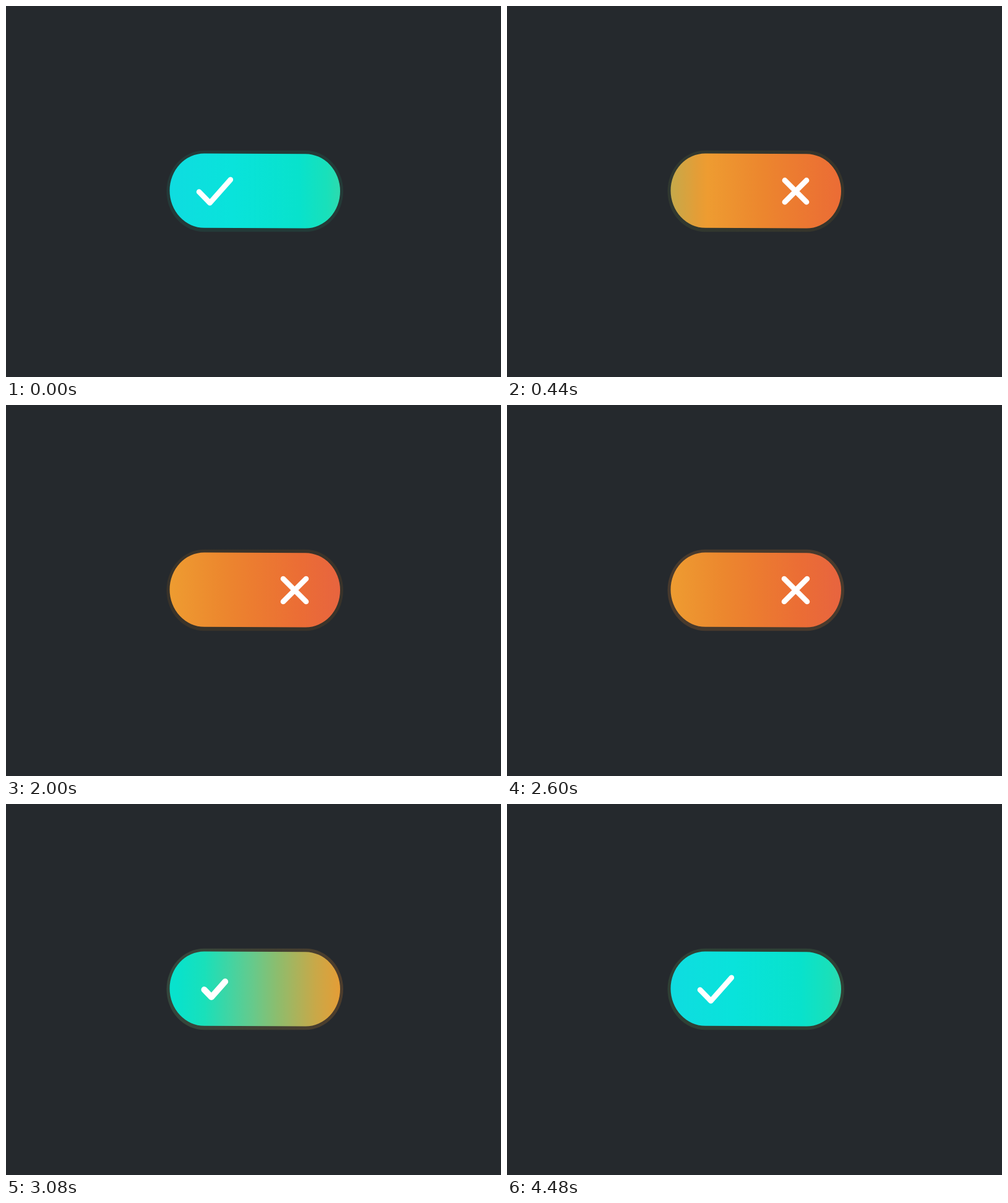
Recreate the animation shown at these times as an HTML page with a canvas. Size 800 px wide and 600 px high, loop 4640 ms.

```html
<!DOCTYPE html>
<html lang="en">
<head>
<meta charset="utf-8">
<title>Toggle</title>
<style>
  html, body { margin: 0; width: 100%; height: 100%; overflow: hidden; background: #25292d; }
  canvas { display: block; width: 800px; height: 600px; }
</style>
</head>
<body>
<canvas id="stage" width="800" height="600"></canvas>
<script>
const ctx = document.getElementById('stage').getContext('2d');
const LOOP = 4640, STEP = 40;
const SLIDE = 720, TURN_OFF = -56, TURN_ON = 2696;
const TRAVEL = 490, BAND = 765, LEFT = 265;

// Colour band that slides behind the pill: [distance, colour]
const band = [
  [0, '#0fdce0'], [100, '#09e3db'], [210, '#08e2cc'], [255, '#19e0ba'],
  [300, '#46d3a0'], [335, '#68c98a'], [375, '#8fbc6c'], [435, '#c9a848'],
  [475, '#e59d36'], [490, '#ee9c31'], [575, '#ec872e'], [625, '#ec7c30'],
  [700, '#eb6d35'], [765, '#e7643f']
];

// Rim colours over time: [ms, left rgb, right rgb]
const rim = [
  [0, [36, 58, 57], [36, 58, 55]],
  [280, [37, 62, 56], [50, 53, 44]],
  [560, [57, 51, 42], [57, 51, 42]],
  [2000, [57, 51, 42], [57, 51, 42]],
  [2520, [72, 58, 45], [72, 58, 45]],
  [2800, [72, 58, 45], [72, 58, 45]],
  [3080, [52, 70, 60], [76, 60, 44]],
  [3360, [47, 64, 53], [47, 64, 53]],
  [LOOP, [47, 64, 53], [47, 64, 53]]
];

const check = { cx: 337, cy: 300, lines: [[[312, 300.5], [329.5, 318.5], [362.8, 280.8]]] };
const cross = { cx: 466.5, cy: 299.5, lines: [[[448, 281], [485, 318]], [[485, 281], [448, 318]]] };

const clamp = x => Math.min(1, Math.max(0, x));
const ease = x => x < 0.5 ? 4 * x ** 3 : 1 - 4 * (1 - x) ** 3;
const slide = (t, start) => ease(clamp((t - start) / SLIDE));

function pill(x0, y0, x1, y1, rx, ry) {
  const cy = (y0 + y1) / 2, half = Math.PI / 2;
  ctx.beginPath();
  ctx.ellipse(x0 + rx, cy, rx, ry, 0, half, 3 * half);
  ctx.ellipse(x1 - rx, cy, rx, ry, 0, -half, half);
  ctx.closePath();
  ctx.fill();
}

function rimFill(t) {
  const i = rim.findIndex(k => k[0] > t);
  const a = rim[i - 1], b = rim[i], f = (t - a[0]) / (b[0] - a[0]);
  const mix = n => `rgb(${a[n].map((v, j) => Math.round(v + (b[n][j] - v) * f))})`;
  const fill = ctx.createLinearGradient(260, 0, 545, 0);
  fill.addColorStop(0, mix(1));
  fill.addColorStop(1, mix(2));
  return fill;
}

function bandFill(p) {
  const x = LEFT - p * TRAVEL;
  const fill = ctx.createLinearGradient(x, 0, x + BAND, 0);
  for (const [d, colour] of band) fill.addColorStop(d / BAND, colour);
  return fill;
}

// hide: 0 is full size, past the middle the icon is gone
function icon({ cx, cy, lines }, hide) {
  const alpha = clamp((0.56 - hide) / 0.12);
  if (!alpha) return;
  const shrink = 1.295 * hide ** 1.5, size = 1 - shrink;
  ctx.save();
  ctx.globalAlpha = alpha;
  ctx.strokeStyle = '#fff';
  ctx.lineCap = ctx.lineJoin = 'round';
  ctx.lineWidth = 8.6 + 4 * shrink;
  if (shrink > 0.02) ctx.filter = `blur(${(2 * shrink).toFixed(2)}px)`;
  ctx.beginPath();
  for (const line of lines) {
    line.forEach(([x, y], i) => {
      const px = cx + (x - cx) * size, py = cy + (y - cy) * size;
      i ? ctx.lineTo(px, py) : ctx.moveTo(px, py);
    });
  }
  ctx.stroke();
  ctx.restore();
}

function draw(time) {
  const t = Math.floor((time % LOOP) / STEP) * STEP;
  const p = slide(t, TURN_OFF) - slide(t, TURN_ON);

  ctx.fillStyle = '#25292d';
  ctx.fillRect(0, 0, 800, 600);
  ctx.fillStyle = rimFill(t);
  pill(259.5, 233.8, 545, 365.3, 61, 65.75);

  ctx.save();
  ctx.transform(1, 0.0035, 0, 1, 0, -1.41);
  ctx.fillStyle = bandFill(p);
  pill(264.5, 238.9, 540, 359.1, 56, 60.1);
  ctx.restore();

  icon(check, p);
  icon(cross, 1 - p);
}

let begin;
function tick(now) {
  begin ??= now;
  draw(now - begin);
  requestAnimationFrame(tick);
}
draw(0);
requestAnimationFrame(tick);
</script>
</body>
</html>
```
